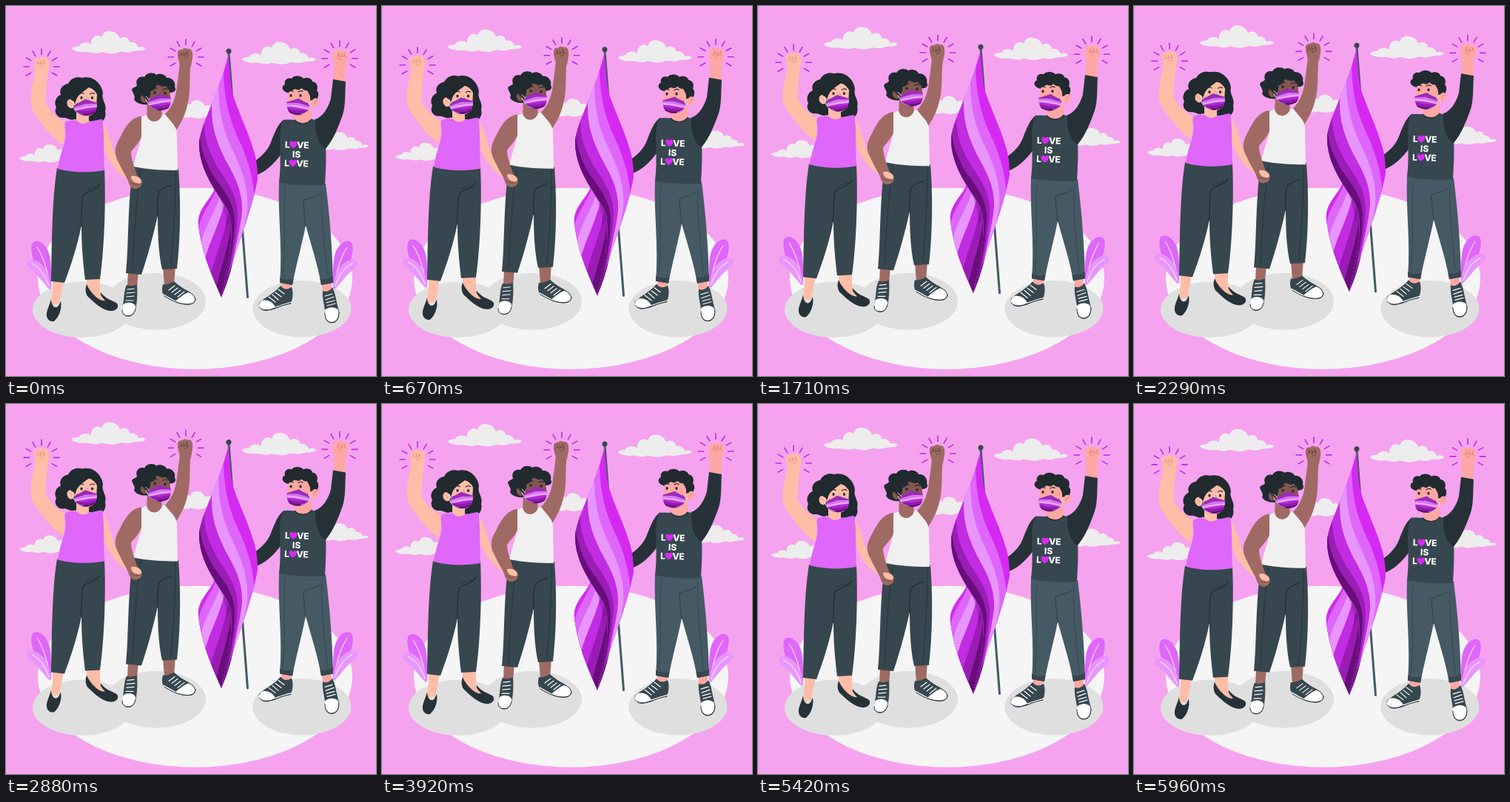
An HTML page with a canvas that plays this animation: 500 px wide and 500 px high, repeating every 6 s.

```html
<!DOCTYPE html>
<html lang="en">
<head>
<meta charset="utf-8">
<title>Love is love</title>
<style>
html, body { margin: 0; width: 100%; height: 100%; overflow: hidden; background: #f5a3ee; }
canvas { display: block; width: 100vw; height: 100vh; }
</style>
</head>
<body>
<canvas id="stage"></canvas>
<script>
const LOOP = 6000, LIFT = 10;
const canvas = document.getElementById('stage');
const ctx = canvas.getContext('2d');
const ratio = Math.max(1, window.devicePixelRatio || 1);
canvas.width = canvas.height = 500 * ratio;

const INK = '#263238', HAIR = '#202a2f', SLATE = '#37474f', STEEL = '#455a64';
const PEACH = '#ffbda7', BROWN = '#9f6a64', DARK = '#855650', ROSE = '#ffa7a3';
const VIOLET = '#bf2be6', ORCHID = '#df67f9', LILAC = '#e895fd', WHITE = '#f5f5f5';

const cache = {};
const path = d => cache[d] || (cache[d] = new Path2D(d));

function fill(color, d) {
  ctx.fillStyle = color;
  ctx.fill(path(d));
}

function line(color, width, d) {
  ctx.strokeStyle = color;
  ctx.lineWidth = width;
  ctx.lineCap = 'round';
  ctx.lineJoin = 'round';
  ctx.stroke(path(d));
}

function oval(color, x, y, rx, ry = rx, turn = 0) {
  ctx.fillStyle = color;
  ctx.beginPath();
  ctx.ellipse(x, y, rx, ry, turn, 0, 7);
  ctx.fill();
}

function group(x, y, sx, sy, draw) {
  ctx.save();
  ctx.translate(x, y);
  ctx.scale(sx, sy);
  draw();
  ctx.restore();
}

function clipped(d, draw) {
  ctx.save();
  ctx.clip(path(d));
  draw();
  ctx.restore();
}

function cloud(x, y, s) {
  group(x, y, s, s, () => fill('#ededed',
    'M0 24C1 20 8 21 10 20C12 15 22 14 26 18C25 11 30 6 35 6C37 6 39 7 40 8C42 2 46 0 50 0' +
    'C58 0 63 4 65 10C70 6 78 9 78 15C85 14 89 18 90 22C94 20 99 21 100 24' +
    'C94 28 86 25 80 28C73 30 68 26 62 29C52 32 46 29 40 28C32 32 25 28 20 28C13 29 5 28 0 24Z'));
}

function rays(x, y) {
  ctx.strokeStyle = VIOLET;
  ctx.lineWidth = 1.6;
  ctx.lineCap = 'round';
  for (let i = 0; i < 9; i++) {
    const a = (30 - i * 30) * Math.PI / 180, c = Math.cos(a), s = Math.sin(a);
    ctx.beginPath();
    ctx.moveTo(x + 16.5 * c, y + 16.5 * s);
    ctx.lineTo(x + 24 * c, y + 24 * s);
    ctx.stroke();
  }
}

function leaves() {
  fill(ORCHID, 'M59 383C45 366 31 337 35 322C39 313 53 319 58 334C62 346 61 366 61 381Z');
  line('#fff', 1, 'M59 377C56 355 49 336 42 326');
  fill(LILAC, 'M59 383C51 376 43 362 31 354C25 348 29 342 36 343C50 345 60 362 61 382Z');
  line('#fff', 1, 'M58 378C53 363 45 353 35 348');
}

function mask(x, y, flip) {
  group(x, y, flip, 1, () => {
    const shape = 'M0 9L3 4C7 3 11 0 15 -2C20 0 26 1 31 3C31 9 30 14 27 17C22 20 16 21 11 19.5C6 18 1 15 0 9Z';
    line('#f3e5f8', 1, 'M2 6L-3 1M2 14L-3 6');
    fill('#b52bd6', shape);
    clipped(shape, () => {
      fill('#9a2cb8', 'M0 -4L34 -4L34 5L16 4L0 9Z');
      fill('#d875f4', 'M0 9L16 4L34 4L34 9L17 9L0 13Z');
      fill('#e9acfb', 'M0 11.5L17 7.5L34 6L34 8L18 10L0 13.5Z');
      fill('#8f1dab', 'M0 14L18 14L34 10L34 24L0 24Z');
      fill('#63107a', 'M4 18L20 17.5L34 13L34 24L4 24Z');
    });
    line('#e9c7f5', .7, 'M2 14.5C5 17 8 18.5 12 19');
  });
}

// A raised fist, its wrist running down out of the box
function fist(x, y, skin, crease, flip = 1) {
  group(x, y, flip, 1, () => {
    fill(skin, 'M0 9C-1 3 3 1 6 2C8 -1 12 0 13 1C17 0 20 3 20 7C21 13 19 17 18 25L3 25C3 18 0 15 0 9Z');
    line(crease, .9, 'M2 11L5 8L8 10L13 7M5 8L4 5M9 9L8 5M13 7L12 4M13 7C16 9 13 13 9 13');
  });
}

function eyes(x1, y1, x2, y2) {
  for (const [x, y] of [[x1, y1], [x2, y2]]) {
    oval(HAIR, x, y, 1.6, 2);
    line(HAIR, 1.2, `M${x - 3} ${y - 5}Q${x} ${y - 7.5} ${x + 3} ${y - 5.5}`);
  }
}

function woman() {
  fill(HAIR, 'M84 105C88 97 96 95 103 97C118 93 130 106 131 118C128 126 137 133 134 142' +
    'C136 150 132 158 124 157L92 153C88 156 82 150 78 151C69 152 64 143 68 137C64 130 68 122 74 120C71 112 77 106 84 105Z');
  // arms
  fill(PEACH, 'M40 88L57 88C54 105 54 120 53 130C59 143 70 153 82 158L77 188C62 178 47 158 38 144C30 132 34 115 40 88Z');
  fist(38, 69, PEACH, '#e58b7c');
  fill(PEACH, 'M127 154C134 158 138 172 142 185C146 202 156 219 168 229L164 234C155 229 146 219 140 209C137 204 134 199 132 193Z');
  // legs and shoes
  fill(PEACH, 'M63 370L78 370C76 382 74 392 72 402L60 404C63 392 63 382 63 370ZM109 367L127 366L127 388L139 400L119 394L109 379Z');
  fill(INK, 'M61 396C61 404 66 411 71 405L74 399C76 410 71 421 65 426C59 427 54 423 55 415C56 409 59 404 61 396Z');
  fill(INK, 'M109 376C113 386 126 400 134 398C129 393 127 390 128 387C134 396 145 398 150 402C153 406 150 411 144 412C133 413 121 403 110 392C107 387 107 381 109 376Z');
  fill(SLATE, 'M69 219L133 219C135 265 133 325 127 369L107 370C105 352 102 330 102 296C97 322 88 350 79 374L61 372C62 325 62 260 69 219Z');
  line(INK, 1.6, 'M127 241C124 249 110 250 104 256C102 266 102 280 101.5 297');
  line(INK, .8, 'M106 249L124 244');
  // top
  fill(PEACH, 'M95 140L112 143L112 162L95 162Z');
  fill(ORCHID, 'M80 157C85 154 92 154 96 155C101 161 109 159 112 156C118 156 125 153 130 153C133 165 132 200 133 222C112 226 88 225 70 220C72 203 78 190 80 180C82 172 78 163 80 157Z');
  // head
  fill(PEACH, 'M94 120C96 108 122 105 123 120L122 138C121 148 108 152 99 147L93 137Z');
  oval(PEACH, 87.5, 132, 5, 6.2, -.3);
  line('#e58b7c', .8, 'M85 130Q89 130 89 135');
  fill(HAIR, 'M88 127C84 108 95 97 105 98C118 98 127 108 126 124C122 117 119 112 112 110C106 115 96 119 94 130Z');
  eyes(102, 124, 116.5, 124);
  line('#e58b7c', 1, 'M110 123L112 128');
  mask(92, 128, 1);
}

function friend() {
  // raised arm
  fill(BROWN, 'M235 78L249.5 78C248 95 249 112 247 125C244 143 238 157 229 169L211 149C220 143 227 131 230 116Z');
  fist(232, 57, BROWN, '#5d3935');
  // legs and shoes
  fill(BROWN, 'M165 358L179 358L177 380L164 380ZM212 353L229 351L227 377L214 378Z');
  fill(SLATE, 'M163 377C168 379 173 378 177 376C178 390 177 402 175 411C173 418 168 420 163 419C157 417 156 411 158 404C160 394 159 386 163 377Z');
  fill('#fff', 'M158 404C162 399 172 400 175 405C176 414 170 419 164 418C157 418 156 410 158 404Z');
  line('#fff', 1.2, 'M164 383L173 382M163 388L174 387M163 393L173 392M162 398L172 398');
  line(INK, .9, 'M157 411C157 417 161 419 165 419C171 419 174 414 175 409');
  fill(SLATE, 'M212 376C216 377 222 375 227 372C235 380 245 384 252 389C258 394 257 401 250 403C242 405 233 402 226 398L213 391C210 386 211 380 212 376Z');
  fill('#fff', 'M246 387C253 389 257 395 254 400C248 404 237 403 229 399C233 395 239 390 246 387Z');
  line('#fff', 1.2, 'M220 384L228 378M224 387L232 381M228 390L236 384M232 393L241 386M213 390L229 399');
  line(INK, .9, 'M214 392C226 400 238 404 249 403C254 402 257 398 256 395');
  fill(SLATE, 'M172 216L233 220C237 270 235 322 231 355L211 356C206 335 205 305 205 283C199 310 191 340 183 363L162 361C166 325 164 265 172 216Z');
  line(INK, 1.6, 'M224 242C217 245 210 246 207 251C204 260 205 270 205 284');
  line(INK, .9, 'M182 222C176 265 173 310 171 356M229 224C230 265 225 320 223 350');
  // body
  fill(BROWN, 'M191 130L210 136L211 152C206 159 195 158 190 152Z');
  fill('#f0f0f0', 'M183 150L190 147C192 158 207 160 211 147L215 146C221 155 230 161 231 171C231 190 232 205 232 222C211 222 191 221 172 217C175 203 180 190 183 178Z');
  fill(BROWN, 'M183 149C170 150 162 162 155 176C147 190 146 197 150 207C155 218 161 228 167 240L178 231C174 219 169 207 169 197C174 190 181 184 183 176Z');
  fill(BROWN, 'M164 230C168 226 178 228 182 233C185 238 184 244 179 246C173 249 168 245 166 240Z');
  fill(PEACH, 'M169 230C175 228 181 232 183 236C183 240 180 241 177 239C173 239 169 235 169 230Z');
  line('#704640', .8, 'M168 238C172 242 178 242 182 240');
  // head
  fill(HAIR, 'M173 126C176 122 171 118 170 113C172 109 176 110 177 107C174 99 181 94 187 96C190 90 199 89 203 93C208 90 216 93 217 97C224 96 230 103 228 109C231 114 227 117 222 117L191 133C184 134 175 131 173 126Z');
  fill(DARK, 'M191 120C193 108 200 104 210 105C219 106 222 114 222 124L220 136C212 143 200 143 192 135Z');
  oval(DARK, 186.5, 125, 4.6, 6, -.3);
  line('#603a36', .8, 'M184 123Q188 123 188 128');
  fill(HAIR, 'M183 120C181 105 192 97 204 97C216 95 226 104 226 116C221 115 218 111 216 108C211 111 207 106 203 107C203 113 197 115 195 115C196 121 193 125 191 127Z');
  eyes(201, 117, 215, 118);
  mask(192, 121, 1);
}

function sweaterText() {
  ctx.save();
  ctx.translate(377.6, 191.5);
  ctx.rotate(.03);
  ctx.fillStyle = '#fff';
  ctx.font = '800 12px Inter, "Liberation Sans", Arial, sans-serif';
  for (const y of [0, 25]) {
    ctx.fillText('L', -.8, y);
    ctx.fillText('VE', 15.3, y);
    group(10.7, y - 4.5, 1, 1, () =>
      fill('#d62cf1', 'M0 5.2C-4 2.5 -5.5 0 -5.2 -2.3C-4.6 -5.3 -1.2 -5.4 0 -2.8C1.2 -5.4 4.6 -5.3 5.2 -2.3C5.5 0 4 2.5 0 5.2Z'));
    ctx.fillStyle = '#fff';
  }
  ctx.fillText('IS', 9.6, 12.8);
  ctx.restore();
}

function man() {
  // far arm
  fill(INK, 'M376 153C367 159 362 174 358 184C353 197 343 205 333 212L336 229C349 226 363 213 372 200Z');
  // legs and shoes
  fill(ROSE, 'M372 374L386 374L385 387L372 384ZM427 373L440 372L440 388L428 389Z');
  fill(SLATE, 'M371 378C376 384 381 383 386 380C389 388 387 397 385 402C372 404 362 411 352 412C343 412 340 406 342 401C350 394 363 388 371 378Z');
  fill('#fff', 'M346 398C355 396 361 401 364 407C357 411 348 412 343 409C340 405 342 401 346 398Z');
  line('#fff', 1.2, 'M368 383L376 389M364 387L372 393M360 390L368 397M355 393L364 400M364 407C372 404 379 402 386 400');
  line(INK, .9, 'M342 407C349 414 362 410 370 406C376 404 381 403 385 402');
  fill(SLATE, 'M428 385C433 387 438 385 441 380C446 390 446 400 450 412C451 422 447 428 440 428C433 428 430 422 431 412C430 402 427 394 428 385Z');
  fill('#fff', 'M431 411C436 406 445 406 449 411C451 421 446 427 440 427C433 427 430 419 431 411Z');
  line('#fff', 1.2, 'M431 392L441 389M432 397L443 393M433 401L444 398M434 405L445 402');
  line(INK, .9, 'M431 415C431 424 435 428 440 428C447 428 450 422 450 414');
  fill(STEEL, 'M369 236L432 240C437 280 441 325 442 374L426 377C421 348 412 322 405 296C401 318 393 346 387 377L370 374C374 325 367 283 369 236Z');
  line(SLATE, 1.5, 'M424 254C416 260 407 259 402 263C402 274 404 286 405 297');
  line(SLATE, 1, 'M377 245C374 285 379 325 374 366M427 249C425 290 431 325 434 364');
  fill(SLATE, 'M370 367C376 370 382 370 388.5 369L387 377L370 374ZM424.5 369C431 370 437 368 442 365L442 374L426 377Z');
  // sweater
  fill(ROSE, 'M390 139L413 136L413 158C406 163 396 162 391 157Z');
  fill(SLATE, 'M375 154C382 153 387 154 391 154C397 160 407 160 412 153C418 153 425 156 427 163C434 178 433 212 431 242C410 243 387 243 369 238C372 216 370 190 370 178C371 168 371 160 375 154Z');
  line(INK, 1.3, 'M390 154C397 161 408 160 413 153');
  sweaterText();
  // raised arm
  fill(ROSE, 'M444 80L459 80L458 107L442 107Z');
  fist(462, 59, ROSE, '#dc7779', -1);
  fill(INK, 'M442 99L459 102C458 119 459 135 455 147C449 164 442 181 432 193C422 188 417 172 418 153C428 150 436 137 439 125Z');
  // head
  fill(HAIR, 'M380 117C371 114 373 107 377 106C375 99 382 96 386 98C390 93 399 94 402 98C408 95 414 99 414 102C421 103 422 110 420 114C424 118 422 124 419 128L408 134Z');
  fill(ROSE, 'M382 114L408 109L414 132C413 146 405 152 396 151C386 150 380 142 380 132Z');
  fill(HAIR, 'M379 115C378 106 390 101 401 102C412 102 417 112 415 126L411 128C412 120 408 117 407 114C403 115 401 112 399 111C396 115 391 113 390 111C387 116 382 116 379 115Z');
  oval(ROSE, 417.5, 130.5, 4.8, 6, .3);
  line('#dc7779', .8, 'M420 128Q416 128 416 133');
  eyes(385, 121, 398, 121);
  mask(410.5, 127, -1);
}

const SHEET = 'M300.5 66C303 90 303 112 309 127C316 147 328 172 334 193C339 208 340 220 340 234C331 284 305 342 291 394' +
  'C299 356 309 316 303 284C298 265 262 232 261 188C261 162 286 125 300.5 66Z';
const LOBE = 'M270 224C277 236 283 244 281 250C275 263 259 275 260 295C264 334 281 370 291 394' +
  'C310 350 318 300 306 270Z';

// Each band lies left of its edge and covers the one before
const SHEET_BANDS = [
  ['#df66fb', 'M294 92C296 140 306 162 318 188C328 212 334 232 336 262L330 300L291 394'],
  [LILAC, 'M287 115C288 148 295 172 307 196C319 222 328 244 326 275C324 292 321 303 316 320L291 394'],
  ['#c22ce2', 'M278 138C278 165 284 182 296 207C309 230 320 250 319 277C317 300 312 315 307 345L291 394'],
  ['#9a1db5', 'M268 160C268 182 275 198 286 218C302 242 313 258 313 284C312 312 306 335 301 365L291 394'],
  ['#670e7a', 'M262 176C263 196 271 212 280 229C297 252 308 266 309 290C309 320 303 345 296 380L291 394']
];
const LOBE_BANDS = [
  ['#9b1cb5', 'M305 282C304 318 291 350 284 381'],
  ['#c22ce2', 'M301 272C298 305 283 336 276 364'],
  [LILAC, 'M296 263C289 295 276 315 269 342'],
  ['#de66fa', 'M290 255C281 283 269 296 264 320'],
  ['#d22bef', 'M284 248C275 270 263 282 260 302']
];

function bands(shape, base, list) {
  fill(base, shape);
  clipped(shape, () => list.forEach(([color, edge]) => {
    const [x, y] = edge.slice(1).split('C')[0].split(' ');
    fill(color, `${edge}L240 394L240 ${y - 30}L${x} ${y - 30}Z`);
  }));
}

function flag() {
  line(STEEL, 3, 'M301 63L326.5 393.5');
  bands(LOBE, '#670e7a', LOBE_BANDS);
  clipped(LOBE, () => fill('rgba(75,10,95,.25)', 'M278 232C283 254 298 268 298 300C305 290 309 275 300 248Z'));
  bands(SHEET, '#d529f1', SHEET_BANDS);
  oval(SLATE, 301, 61, 3.5);
}

function frame(now) {
  const t = now % LOOP;
  const dy = -LIFT * (1 - Math.abs(1 - t / (LOOP / 2)));
  ctx.setTransform(ratio, 0, 0, ratio, 0, 0);
  ctx.fillStyle = '#f5a3ee';
  ctx.fillRect(0, 0, 500, 500);
  oval(WHITE, 255.5, 368.3, 212.5, 122.6);
  oval('#dfdfdf', 103, 410.3, 67, 37.7);
  oval('#dfdfdf', 203, 399.2, 67, 38.5);
  oval('#dfdfdf', 400, 409.2, 66.5, 38.2);

  ctx.translate(0, dy);
  cloud(89, 34, 1);
  cloud(319, 48.5, 1);
  cloud(217, 127.5, .8);
  cloud(410, 170.5, .8);
  cloud(18, 187, .8);
  leaves();
  group(503, 0, -1, 1, leaves);
  rays(48, 82);
  rays(243, 69);
  rays(451, 71);
  woman();
  friend();
  man();
  flag();
  requestAnimationFrame(frame);
}

requestAnimationFrame(frame);
</script>
</body>
</html>
```
